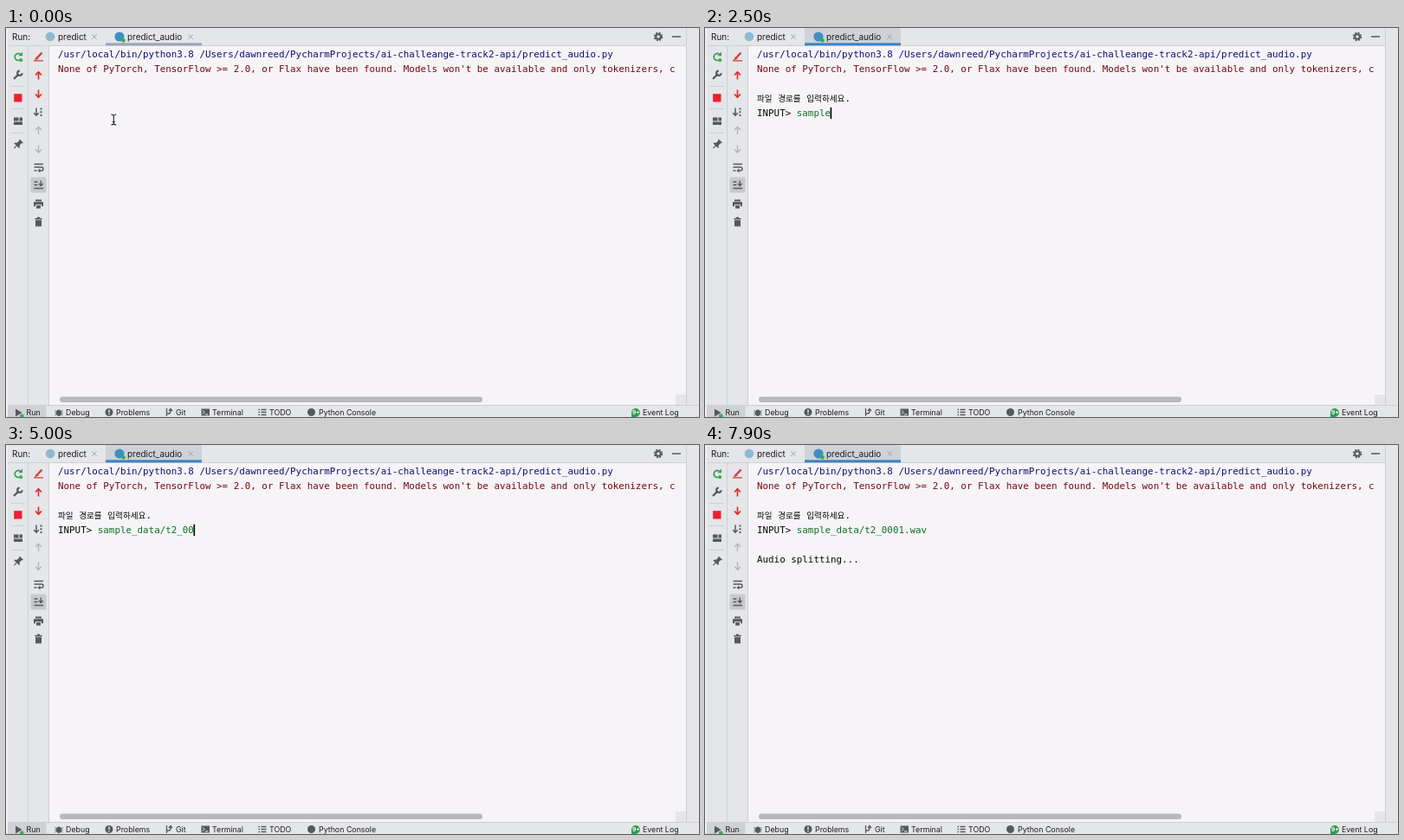
An HTML page for the animation above (8000 ms loop, 800x450 px).

```html
<!DOCTYPE html>
<html lang="en">
<head>
<meta charset="utf-8">
<title>Run console</title>
<style>
html, body { margin: 0; width: 100%; height: 100%; overflow: hidden; background: #e5e6e9; }
svg { display: block; width: 800px; height: 450px; }
text { white-space: pre; }
.ui { font: 9.95px Inter, sans-serif; fill: #1c1c1f; }
.bar { font: 8.85px Inter, sans-serif; fill: #1c1c1f; }
.code { font: 10.86px "DejaVu Sans Mono", monospace; fill: #080808; }
.ko { font: 9.6px "Noto Sans CJK KR", "Noto Sans CJK", sans-serif; }
.line { fill: none; stroke: #56585d; stroke-width: 1.5; }
.fill { fill: #56585d; }
.rule { fill: none; stroke: #cfd0d4; }
</style>
</head>
<body>
<svg viewBox="0 0 800 450">
  <defs>
    <clipPath id="view"><rect x="50" y="20" width="723" height="404"/></clipPath>
  </defs>

  <!-- panels -->
  <rect width="800" height="450" fill="#e5e6e9"/>
  <rect width="2" height="450" fill="#f0f0f2"/>
  <rect x="50" y="20" width="735" height="417" fill="#f6f4f7"/>
  <rect x="773" y="424" width="12" height="13" fill="#e6e5e8"/>
  <path class="rule" d="M2 20.5H785M25.5 21V436M49.5 21V436M2 436.5H800M785.5 0V436"/>
  <path class="rule" d="M5 67.5H22M5 93.5H22M5 121.5H22"/>
  <rect x="62" y="426.5" width="488" height="6.5" rx="3.25" fill="#b9b8bb"/>

  <!-- tabs -->
  <rect id="tab" x="115" width="111" height="20"/>
  <rect id="underline" x="115" y="17.3" width="111" height="3"/>
  <g class="ui">
    <text x="7" y="13.7">Run:</text>
    <text x="60" y="13.7">predict</text>
    <text x="140" y="13.7">predict_audio</text>
  </g>
  <circle cx="51" cy="10" r="5.3" fill="#8eb9d3"/>
  <circle cx="131" cy="10" r="5.6" fill="#3f8fc4"/>
  <circle cx="135.5" cy="14.3" r="2.4" fill="#35b04a"/>
  <path d="M99.3 7.5l5.4 5.4m0-5.4l-5.4 5.4M210.5 7.5l5.4 5.4m0-5.4l-5.4 5.4" stroke="#a2a3a8" fill="none"/>
  <circle class="line" cx="753" cy="10" r="2.8" style="stroke-width:2"/>
  <circle class="line" cx="753" cy="10" r="4.4" style="stroke-width:1.7" stroke-dasharray="2.1 1.355"/>
  <path class="line" d="M769 10H779"/>

  <!-- run controls -->
  <path d="M16.5 30.2A4 4 0 1 0 17.8 35.2" fill="none" stroke="#35a04c" stroke-width="1.7"/>
  <path d="M14.5 32.3H19V27.5Z" fill="#35a04c"/>
  <circle cx="17.3" cy="37.3" r="1.9" fill="#35b04a"/>
  <path class="line" d="M9 59L14.6 53.4" style="stroke-width:2.3"/>
  <path class="line" d="M15.8 49.5A2.7 2.7 0 1 0 18.6 52.3" style="stroke-width:2.2"/>
  <rect x="9.2" y="76.2" width="9.3" height="9.3" fill="#ee1f30"/>
  <path class="fill" d="M9 103.5h5.5v4H9zM15.5 103.5H19v4h-3.5zM9 108.5H19v3.5H9z"/>
  <g class="fill" transform="translate(14 134.5) rotate(45)">
    <path d="M-2.8-5.5h5.6v1.3H2v3.7l2 2v1h-8v-1l2-2v-3.7h-.8z"/>
    <path d="M-.6 2h1.2v4.5H-.6z"/>
  </g>

  <!-- console controls -->
  <path d="M41.5 28.5L36.5 34" stroke="#d5382f" stroke-width="2.2" fill="none"/>
  <path d="M33 37.2L35 33l3 2.5zM32 37.3h11v1.3H32z" fill="#d5382f"/>
  <g fill="none" stroke="#dc2f26" stroke-width="1.7">
    <path d="M37.5 59.5V51M34 54.5l3.5-3.7 3.5 3.7"/>
    <path d="M37.5 71.5V80M34 76.5l3.5 3.7 3.5-3.7"/>
  </g>
  <path class="line" d="M35 92.5V101M32.2 98.2l2.8 3 2.8-3"/>
  <path class="fill" d="M39.5 92.5h2v2h-2zM39.5 96.2h2v2h-2zM39.5 100h2v2h-2z"/>
  <g fill="none" stroke="#b4b5b9" stroke-width="1.4">
    <path d="M37.5 123V114.5M34 118l3.5-3.7 3.5 3.7"/>
    <path d="M37.5 135.5V144M34 140.5l3.5 3.7 3.5-3.7"/>
  </g>
  <path class="line" d="M32.5 157.5H43M32.5 161H41a2 2 0 0 1 0 4H38M32.5 165H35.5" style="stroke-width:1.4"/>
  <path class="fill" d="M39.3 162.5V167.5L36.5 165z"/>
  <rect x="28.5" y="172.5" width="18" height="18" rx="2" fill="#c8c9cd"/>
  <path class="line" d="M32.5 185.5H43M32.5 181.5H36.5M32.5 178H36.5M40.3 176.5V182M38 180l2.3 2.5 2.3-2.5" style="stroke-width:1.4"/>
  <path class="fill" d="M34 198.5h7v2h-7zM32 201.3h11v5h-2v-2h-7v2h-2zM35 205.3h5v3.5h-5z"/>
  <path class="fill" d="M33.3 220h8.4v1.4h-8.4zM35.9 218.8h3.2v1.2h-3.2zM34 222.200h7v7.300h-7z"/>

  <!-- bottom bar -->
  <rect x="2" y="437" width="44.5" height="13" fill="#d0d1d5"/>
  <path class="fill" d="M11 440.5L18.5 445 11 449.5z"/>
  <circle cx="18.3" cy="448.8" r="2.3" fill="#35b04a"/>
  <ellipse class="fill" cx="61" cy="445.2" rx="2.9" ry="3.8"/>
  <path class="line" d="M56.5 442.5l9 5.4m0-5.4l-9 5.4M56.3 445.2h9.4" style="stroke-width:1"/>
  <circle class="fill" cx="119" cy="444.5" r="4.5"/>
  <path d="M118.3 441.5h1.4v3.7h-1.4zM118.3 446.2h1.4v1.4h-1.4z" fill="#eee"/>
  <path class="line" d="M185.5 440V449M185.5 446H188Q190 446 190 443V441M188 443l2-2.5 2 2.5" style="stroke-width:1.3"/>
  <rect class="fill" x="225.5" y="440.5" width="9.5" height="8"/>
  <path d="M227 442.3l2.2 2.2-2.2 2.2M230 447h3.5" stroke="#eee" fill="none"/>
  <path class="line" d="M291.5 441.5h1.5M294.5 441.5h6M291.5 444.5h1.5M294.5 444.5h6M291.5 447.5h1.5M294.5 447.5h6" style="stroke-width:1.3"/>
  <circle class="fill" cx="352.5" cy="444.5" r="4.5"/>
  <path d="M722 450V444.5a5 5 0 1 1 5 5.5z" fill="#2f9e50"/>
  <text x="723" y="447.2" font-family="Inter, sans-serif" font-size="6.5" font-weight="700" fill="#fff">9+</text>
  <g class="bar">
    <text x="23.5" y="447.8">Run</text>
    <text x="69" y="447.8">Debug</text>
    <text x="127" y="447.8">Problems</text>
    <text x="196" y="447.8">Git</text>
    <text x="238" y="447.8">Terminal</text>
    <text x="304" y="447.8">TODO</text>
    <text x="361" y="447.8">Python Console</text>
    <text x="735" y="447.8">Event Log</text>
  </g>

  <!-- console output -->
  <g class="code" clip-path="url(#view)">
    <text x="60" y="33.6" fill="#10106c">/usr/local/bin/python3.8 /Users/dawnreed/PycharmProjects/ai-challeange-track2-api/predict_audio.py</text>
    <text x="60" y="50.8" fill="#720b0d">None of PyTorch, TensorFlow >= 2.0, or Flax have been found. Models won't be available and only tokenizers, c</text>
    <g id="prompt">
      <text x="60" y="84.8"><tspan class="ko">파일</tspan> <tspan class="ko">경로를</tspan> <tspan class="ko">입력하세요</tspan>.</text>
      <text x="60" y="102">INPUT> <tspan id="typed" fill="#0f7024"></tspan></text>
    </g>
    <text id="result" x="60" y="136.4">Audio splitting...</text>
  </g>
  <rect id="caret" y="91.8" width="1.6" height="13.4" fill="#000"/>
  <path id="mouse" d="M-3-6Q0-6 0-4Q0-6 3-6M0-4.5V4.5M-3 6Q0 6 0 4Q0 6 3 6M-1.5 2.5H1.5" fill="none" stroke="#222" stroke-width="1.1"/>
</svg>
<script>
const LOOP = 8000, PROMPT_AT = 400, CLICK_AT = 760, FOCUS_AT = 860, ENTER_AT = 7000, RESULT_AT = 7400;
const ADVANCE = 6.538;
const PATH = "sample_data/t2_0001.wav";
// [time, characters typed]
const KEYS = [[1350, 1], [2450, 6], [3550, 11], [4950, 17], [6300, 23]];
const [tab, underline, prompt, typed, result, caret, mouse] =
  ["tab", "underline", "prompt", "typed", "result", "caret", "mouse"].map(id => document.getElementById(id));

const show = (el, on) => el.setAttribute("visibility", on ? "visible" : "hidden");

function typedCount(t) {
  if (t < KEYS[0][0]) return 0;
  for (let i = 1; i < KEYS.length; i++) {
    const [t0, n0] = KEYS[i - 1], [t1, n1] = KEYS[i];
    if (t < t1) return Math.floor(n0 + (n1 - n0) * (t - t0) / (t1 - t0));
  }
  return PATH.length;
}

function caretOn(t, count) {
  if (t < CLICK_AT || t >= ENTER_AT) return false;
  if (count > 0 && count < PATH.length) return true;
  const since = t - (count ? KEYS[KEYS.length - 1][0] : CLICK_AT);
  return since % 1000 < 500;
}

function draw(now) {
  const t = now % LOOP, count = typedCount(t), focused = t >= FOCUS_AT;
  // the tab darkens once a click gives the console focus
  tab.setAttribute("fill", focused ? "#d0d2d7" : "#e5e6e9");
  underline.setAttribute("fill", focused ? "#3e83c5" : "#9ca7b8");

  show(prompt, t >= PROMPT_AT);
  show(result, t >= RESULT_AT);
  typed.textContent = PATH.slice(0, count);
  caret.setAttribute("x", 59.6 + (7 + count) * ADVANCE);
  show(caret, caretOn(t, count));

  const p = Math.min(1, Math.max(0, (t - 100) / 600)), ease = p * p * (3 - 2 * p);
  mouse.setAttribute("transform", `translate(${124.3 - 3.8 * ease} ${106 - 9 * ease})`);
  show(mouse, count === 0);
  requestAnimationFrame(draw);
}
requestAnimationFrame(draw);
</script>
</body>
</html>
```
